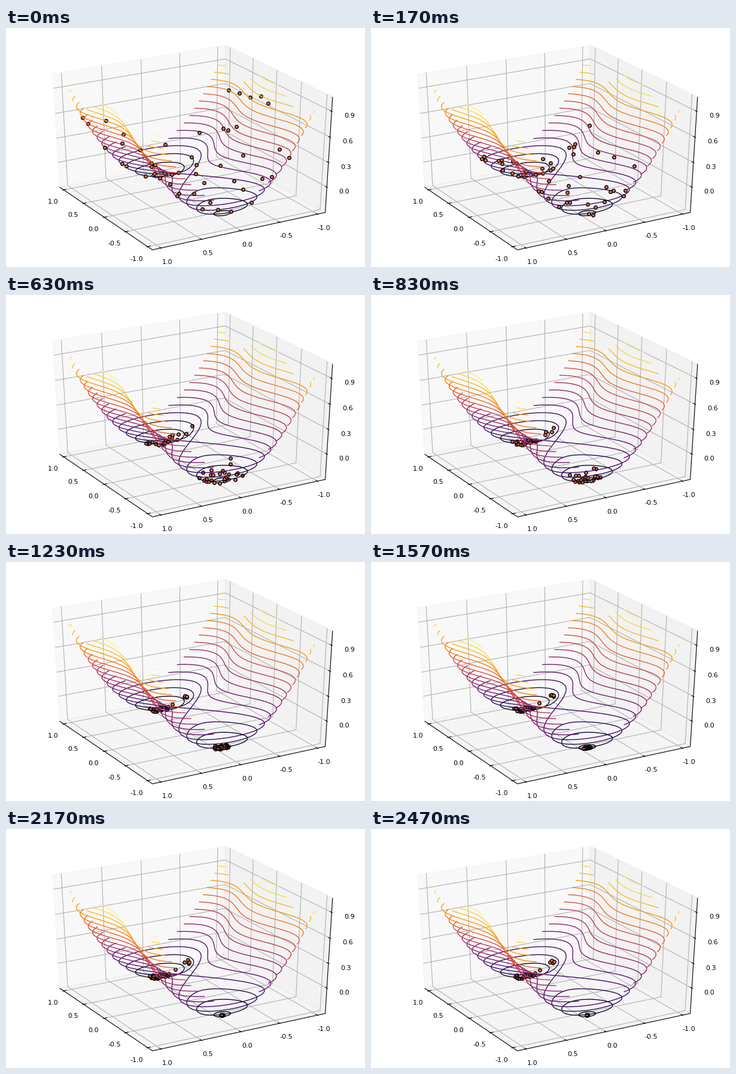
A matplotlib script that plays this animation: 600x400 px, repeating every 2.51 s.

```python
import numpy as np
import matplotlib.pyplot as plt
from matplotlib.animation import FuncAnimation
from matplotlib.collections import LineCollection

LOOP_MS, TICK_MS, STEPS = 2510, 10, 75
SIDE = 7                    # the swarm starts on a jittered SIDE x SIDE grid
AZIM, ELEV = np.radians([150, 30])
DIST = 10
CENTER = np.array([308.0, 194.0])
SCALE = np.array([320.07, -211.96])
PAD = 0.5 + 1 / 48          # panes reach a little past the axis limits
LABEL_GAP = 0.065
EYE = np.array([np.cos(ELEV) * np.cos(AZIM), np.cos(ELEV) * np.sin(AZIM), np.sin(ELEV)])
RIGHT = np.array([-np.sin(AZIM), np.cos(AZIM), 0])
UP = np.cross(EYE, RIGHT)


def height(x, y):
    return x**4 - x**2 + y**2


def norm_xy(v):
    return np.asarray(v) / 2.12


def norm_z(z):
    return (np.asarray(z) - 0.375) / 1.325


def project(p):
    """Perspective view of points in the unit box, in pixels."""
    p = np.asarray(p, float)
    flat = np.stack([p @ RIGHT, p @ UP], axis=-1)
    return CENTER + SCALE * flat * (DIST / (DIST - p @ EYE))[..., None]


def box_points(xy, z):
    return np.column_stack([norm_xy(xy), np.broadcast_to(norm_z(z), len(xy))])


fig = plt.figure(figsize=(6, 4), dpi=100, facecolor="white")
ax = fig.add_axes([0, 0, 1, 1])
ax.axis("off")


def line(points, color, zorder):
    ax.plot(*project(points).T, color=color, lw=0.8, zorder=zorder, solid_capstyle="butt")


def label(value, at, outward):
    x, y = project(np.array(at) + LABEL_GAP * np.array(outward))
    ax.text(x, y, f"{value:.1f}", ha="center", va="top", fontsize=8,
            family="DejaVu Sans", zorder=5)


def draw_box():
    p = PAD
    panes = [
        ([(p, p, -p), (p, -p, -p), (p, -p, p), (p, p, p)], 0.95),
        ([(p, -p, -p), (-p, -p, -p), (-p, -p, p), (p, -p, p)], 0.90),
        ([(p, p, -p), (p, -p, -p), (-p, -p, -p), (-p, p, -p)], 0.925),
    ]
    for corners, grey in panes:
        ax.fill(*project(corners).T, facecolor=str(grey), edgecolor=str(grey),
                alpha=0.5, lw=1, zorder=1)

    out, inn = p + 0.1 / 12, p - 0.2 / 12
    for v in (1, 0.5, 0, -0.5, -1):
        c = float(norm_xy(v))
        line([(c, p, -p), (c, -p, -p), (c, -p, p)], "#b0b0b0", 2)
        line([(-p, c, -p), (p, c, -p), (p, c, p)], "#b0b0b0", 2)
        line([(c, out, -p), (c, inn, -p)], "black", 4)
        line([(-out, c, -p), (-inn, c, -p)], "black", 4)
        label(v, (c, p, -p), (0, 1, -1))
        label(v, (-p, c, -p), (-1, 0, -1))
    for v in (0, 0.3, 0.6, 0.9):
        c = float(norm_z(v))
        line([(-p, -p, c), (p, -p, c), (p, p, c)], "#b0b0b0", 2)
        line([(-out, -p, c), (-inn, -p, c)], "black", 4)
        label(v, (-p, -p, c), (-1, -1, 0))
    line([(p, p, -p), (-p, p, -p), (-p, -p, -p), (-p, -p, p)], "black", 4)


def draw_contours():
    axis = np.linspace(-1, 1, 200)
    levels = np.arange(-3, 13) * 0.08
    gx, gy = np.meshgrid(axis, axis)
    rings = ax.contour(gx, gy, height(gx, gy), levels=levels)
    for z, segs in zip(levels, rings.allsegs):
        paths = [box_points(s, z) for s in segs if len(s) > 1]
        nearest = max((s @ EYE).max() for s in paths)
        ax.add_collection(LineCollection(
            [project(s) for s in paths], colors=[plt.cm.inferno((z + 0.25) / 1.25)],
            linewidths=1, zorder=10 + nearest))
    rings.remove()


# Each agent closes in on the well on its side; the far group keeps some spread.
rng = np.random.default_rng(8)
cells = np.stack(np.meshgrid(np.arange(SIDE), np.arange(SIDE)), axis=-1).reshape(-1, 2)
start = 2 * (cells + rng.random(cells.shape)) / SIDE - 1
far = start[:, 0] > 0
spread = rng.random(len(start))
rest = np.column_stack([
    np.where(far, np.sqrt(0.5) + rng.uniform(-0.07, 0.07, len(start)), -np.sqrt(0.5)),
    np.where(far, 0.1 - 0.55 * spread**3, 0)])
settle = np.where(far, 10, 15)[:, None]
wobble = rng.normal(size=(STEPS, *start.shape))


def swarm(k):
    fade = np.exp(-k / settle)
    shake = 0.12 * fade * min(k, 1) + 0.006 * far[:, None]
    return np.clip(rest + (start - rest) * fade + wobble[k] * shake, -1, 1)


draw_box()
draw_contours()
agents = ax.scatter([], [], s=16, facecolor="#e26f46", edgecolor="black", linewidth=1)
ax.set_xlim(0, 600)
ax.set_ylim(400, 0)


def update(i):
    k = min(STEPS - 1, (i * TICK_MS + 5) * 3 // 100)   # 30 steps a second
    xy = swarm(k)
    points = box_points(xy, height(*xy.T))
    agents.set_offsets(project(points))
    agents.set_zorder(10 + (points @ EYE).max())       # layered by the nearest agent
    return [agents]


anim = FuncAnimation(fig, update, frames=LOOP_MS // TICK_MS, interval=TICK_MS,
                     repeat=True, repeat_delay=0, blit=False)
plt.show()
```
